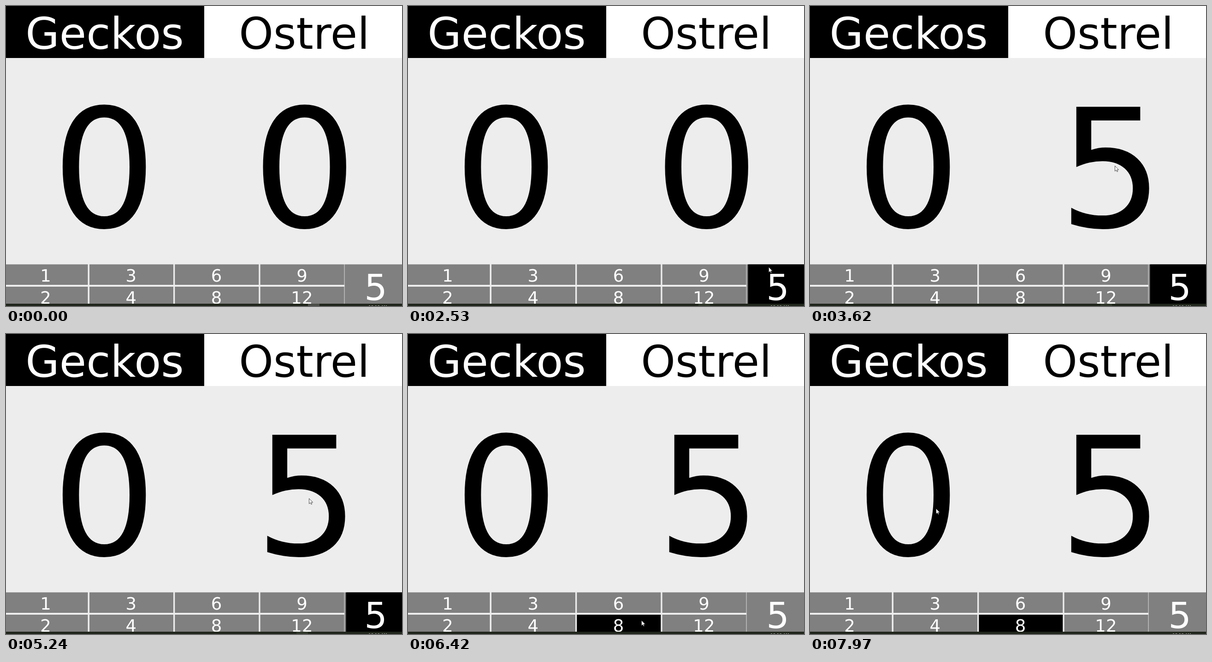
An HTML page for the animation above (8000 ms loop, 859 by 652 pixels).

```html
<!DOCTYPE html>
<html lang="en">
<head>
<meta charset="utf-8">
<title>Scoreboard</title>
<style>
  html, body { margin: 0; width: 100%; height: 100%; overflow: hidden; background: #ededed; }
  svg { display: block; width: 100%; height: 100%; }
  text { font-family: "DejaVu Sans", sans-serif; text-anchor: middle; text-rendering: geometricPrecision; }
  .team { font-size: 95px; }
  .score { font-size: 358px; }
  .points { font-size: 37px; fill: #fff; }
</style>
</head>
<body>
<svg viewBox="0 0 859 652">
  <rect width="859" height="652" fill="#ededed"/>
  <rect width="430" height="113"/>
  <rect x="430" width="429" height="113" fill="#fff"/>
  <text class="team" x="214" y="93" fill="#fff">Geckos</text>
  <text class="team" x="647" y="93">Ostrel</text>
  <text class="score" x="213.2" y="480">0</text>
  <text class="score" id="rightScore" y="480"></text>

  <g id="buttons"></g>
  <rect x="734.5" y="561.5" width="124.5" height="86" fill="#808080"/>
  <rect id="five" x="737.5" y="561.5" width="121.5" height="86"/>
  <text x="802" y="639" font-size="78" fill="#fff">5</text>

  <rect y="647" width="859" height="5" fill="#20261b"/>
  <rect id="task" y="647" width="25" height="5"/>
  <text x="806.5" y="657" font-size="8.5" fill="#ddd">10:10 AM</text>

  <g id="pointer">
    <circle id="click" r="8.3" fill="#ff0" fill-opacity=".5"/>
    <path d="M.5.5V12L3.2 9.5 5 13.3 6.7 12.5 5 8.9H8.6Z" fill="#fff" stroke="#222" stroke-width=".8"/>
  </g>
</svg>
<script>
const LOOP = 8000;
const $ = id => document.getElementById(id);

[[1, 2], [3, 4], [6, 8], [9, 12]].forEach((pair, col) => pair.forEach((value, row) => {
  const left = col ? 181 + (col - 1) * 185.3 : 0;
  const width = col ? 182 : 177.5;
  $('buttons').innerHTML +=
    `<rect id="b${value}" x="${left}" y="${row ? 610 : 561.5}" width="${width}" height="${row ? 38 : 44.5}" fill="#808080"/>` +
    `<text class="points" x="${86 + col * 185.3}" y="${599 + row * 48}">${value}</text>`;
}));

// The pointer moves in discrete steps, as a screen recorder samples it.
const moves = [
  { start: 730, end: 990, steps: 4, from: [789, 660], to: [789, 580] },
  { start: 2530, end: 3010, steps: 7, from: [789, 580], to: [661, 347] },
  { start: 5240, end: 6020, steps: 11, from: [661, 351], to: [506, 622] },
  { start: 7180, end: 7970, steps: 11, from: [506, 622], to: [273, 379] }
];
const clicks = [[1830, 1990], [3450, 3620], [6250, 6420]];
const within = (t, [start, end]) => t >= start && t < end;
const show = (id, on) => $(id).setAttribute('visibility', on ? 'visible' : 'hidden');

function pointerAt(t) {
  const move = moves.filter(m => t >= m.start).pop();
  const { start, end, steps, from, to } = move;
  const interval = (end - start) / (steps - 1);
  const step = Math.min(steps, Math.floor((t - start) / interval + 1e-6) + 1);
  const u = step / steps;
  const eased = u * u * (3 - 2 * u);
  return from.map((v, i) => Math.round(v + (to[i] - v) * eased));
}

function render(t) {
  const scored = t >= 3620;
  $('rightScore').textContent = scored ? '5' : '0';
  $('rightScore').setAttribute('x', scored ? 653 : 647.8);

  show('five', within(t, [1990, 6420]));
  $('b8').setAttribute('fill', t >= 6420 ? '#000' : '#808080');

  const idle = t < 1830;
  show('task', idle || within(t, [1990, 6420]));
  $('task').setAttribute('x', idle ? 655 : 630);
  $('task').setAttribute('fill', idle ? '#4b4e48' : '#30382b');

  const visible = t >= moves[0].start;
  $('pointer').style.display = visible ? '' : 'none';
  if (visible) $('pointer').setAttribute('transform', `translate(${pointerAt(t)})`);
  show('click', clicks.some(span => within(t, span)));
}

const origin = performance.now();
function frame() {
  render((performance.now() - origin) % LOOP);
  requestAnimationFrame(frame);
}
frame();
</script>
</body>
</html>
```
